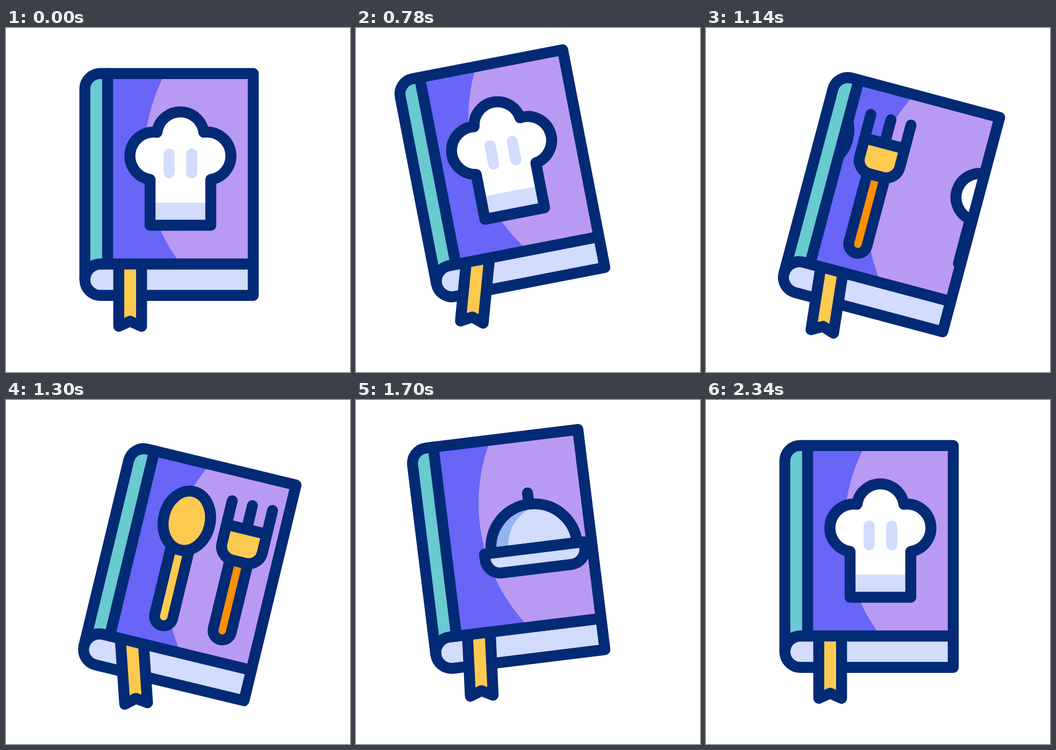
Recreate the animation shown at these times as an HTML page with a canvas. Size 640 by 640 pixels, loop 2.4 s.

```html
<!DOCTYPE html>
<html lang="en">
<head>
<meta charset="utf-8">
<title>Cookbook</title>
<style>
html, body { margin: 0; width: 100%; height: 100%; overflow: hidden; background: #fff; }
canvas { display: block; }
</style>
</head>
<body>
<canvas id="stage" width="640" height="640"></canvas>
<script>
const ctx = document.getElementById('stage').getContext('2d');
const LOOP = 2400, LINE = 20.4, STEP = 307;
const NAVY = '#032a75', BLUE = '#6865f7', LILAC = '#b99af2', TEAL = '#69cad1';
const PALE = '#d2dcfd', SHADE = '#95b3f3', YELLOW = '#fdca50', ORANGE = '#fe9003';

// [time, value] pairs, eased in and out between neighbours
const TILT = [[200, 0], [700, -13], [1200, 16], [1700, -7], [2200, 0]];
const SWING = [[200, 0], [800, 16.6], [1380, -19.3], [1820, 9.5], [2340, 0]];
const SLIDE = [[200, 0], [600, -40], [2310, 3 * STEP]];

function at(keys, t) {
  if (t <= keys[0][0]) return keys[0][1];
  for (let i = 1; i < keys.length; i++) {
    const [t0, a] = keys[i - 1], [t1, b] = keys[i];
    if (t < t1) {
      const u = (t - t0) / (t1 - t0);
      return a + (b - a) * u * u * (3 - 2 * u);
    }
  }
  return keys[keys.length - 1][1];
}

function turn(x, y, deg) {
  ctx.translate(x, y);
  ctx.rotate(deg * Math.PI / 180);
  ctx.translate(-x, -y);
}

function fill(path, color) {
  ctx.fillStyle = color;
  ctx.fill(path);
}

function stroke(path, color = NAVY, width = LINE, cap = 'round') {
  ctx.strokeStyle = color;
  ctx.lineWidth = width;
  ctx.lineCap = cap;
  ctx.stroke(path);
}

function line(x0, y0, x1, y1, color, width, cap) {
  stroke(new Path2D(`M${x0} ${y0}L${x1} ${y1}`), color, width, cap);
}

function disc(x, y, rx, ry = rx) {
  const p = new Path2D();
  p.ellipse(x, y, rx, ry, 0, 0, 2 * Math.PI);
  return p;
}

function clipped(path, draw) {
  ctx.save();
  ctx.clip(path);
  draw();
  ctx.restore();
}

// Icons are centred on x = 0
const hatShape = new Path2D();
hatShape.moveTo(-56.5, 367);
hatShape.lineTo(-56.5, 282);
hatShape.arc(-49.5, 238, 44.5, Math.atan2(44, -7), Math.atan2(-44, 6) + 2 * Math.PI);
hatShape.arc(0, 200, 44, Math.atan2(-6, -43.5), Math.atan2(-6, 43.5));
hatShape.arc(49.5, 238, 44.5, Math.atan2(-44, -6), Math.atan2(44, 7));
hatShape.lineTo(56.5, 367);
hatShape.closePath();

function hat() {
  fill(hatShape, '#fff');
  ctx.fillStyle = PALE;
  ctx.fillRect(-56, 325, 112, 40);
  for (const x of [-21, 21]) line(x, 234.5, x, 269.5, PALE, 20.5);
  stroke(hatShape);
}

// The round lower end comes from a full cap, the flat top from a butt line
function handle(x, top, color) {
  line(x, top - 10, x, 380.4, NAVY, 54.4, 'butt');
  fill(disc(x, 380.4, 27.2), NAVY);
  line(x, top, x, 380.4, color, 14, 'butt');
  fill(disc(x, 380.4, 7), color);
}

const prongs = new Path2D('M-38.6 141V222A26 26 0 0 0 -12.6 248.5H12.6A26 26 0 0 0 38.6 222V141M0 141V186.5M-38.6 186.5H38.6');
const forkHead = new Path2D('M-38.6 186.5V222A26 26 0 0 0 -12.6 248.5H12.6A26 26 0 0 0 38.6 222V186.5Z');

function cutlery() {
  handle(-51.5, 263, YELLOW);
  const bowl = disc(-51.5, 197, 43.4, 55.8);
  fill(bowl, YELLOW);
  stroke(bowl);
  ctx.save();
  ctx.translate(60.5, 0);
  handle(0, 257, ORANGE);
  fill(forkHead, YELLOW);
  stroke(prongs);
  ctx.restore();
}

const dome = new Path2D('M-80.4 293.5V292A80.4 80.4 0 0 1 80.4 292V293.5Z');
const tray = new Path2D('M-93.3 293.8V304.5A28 28 0 0 0 -65.3 332.5H65.3A28 28 0 0 0 93.3 304.5V293.8Z');

function cloche() {
  line(0, 190.6, 0, 211);
  fill(dome, SHADE);
  clipped(dome, () => fill(disc(30, 292, 78), PALE));
  stroke(dome);
  fill(tray, PALE);
  stroke(tray);
}

const pages = new Path2D('M460 439H176A29.2 29.2 0 0 0 176 497.5H460Z');
const cover = new Path2D('M460 84.8H175.2A28.5 28.5 0 0 0 146.7 113.3V468.2A29.2 29.2 0 0 1 176 439H460Z');
const front = new Path2D('M189 85H460V439H189Z');
const ribbon = new Path2D('M209.8 428V555L231 545.5L252.2 555V428');

function draw(t) {
  ctx.fillStyle = '#fff';
  ctx.fillRect(0, 0, 640, 640);
  ctx.lineJoin = 'round';
  ctx.save();
  turn(191, 456, at(TILT, t));

  fill(pages, PALE);
  stroke(pages);

  ctx.save();
  turn(231, 438, at(SWING, t));
  fill(ribbon, YELLOW);
  stroke(ribbon);
  ctx.restore();

  fill(cover, TEAL);
  clipped(front, () => {
    fill(front, BLUE);
    fill(disc(587.5, 239, 330), LILAC);
    const slide = at(SLIDE, t);
    [hat, cutlery, cloche, hat].forEach((icon, i) => {
      const x = slide - i * STEP;
      if (Math.abs(x) > 260) return;
      ctx.save();
      ctx.translate(324.5 + x, 0);
      icon();
      ctx.restore();
    });
  });
  stroke(cover);
  line(189, 84.8, 189, 439);
  ctx.restore();
}

function tick() {
  draw(performance.now() % LOOP);
  requestAnimationFrame(tick);
}
tick();
</script>
</body>
</html>
```
